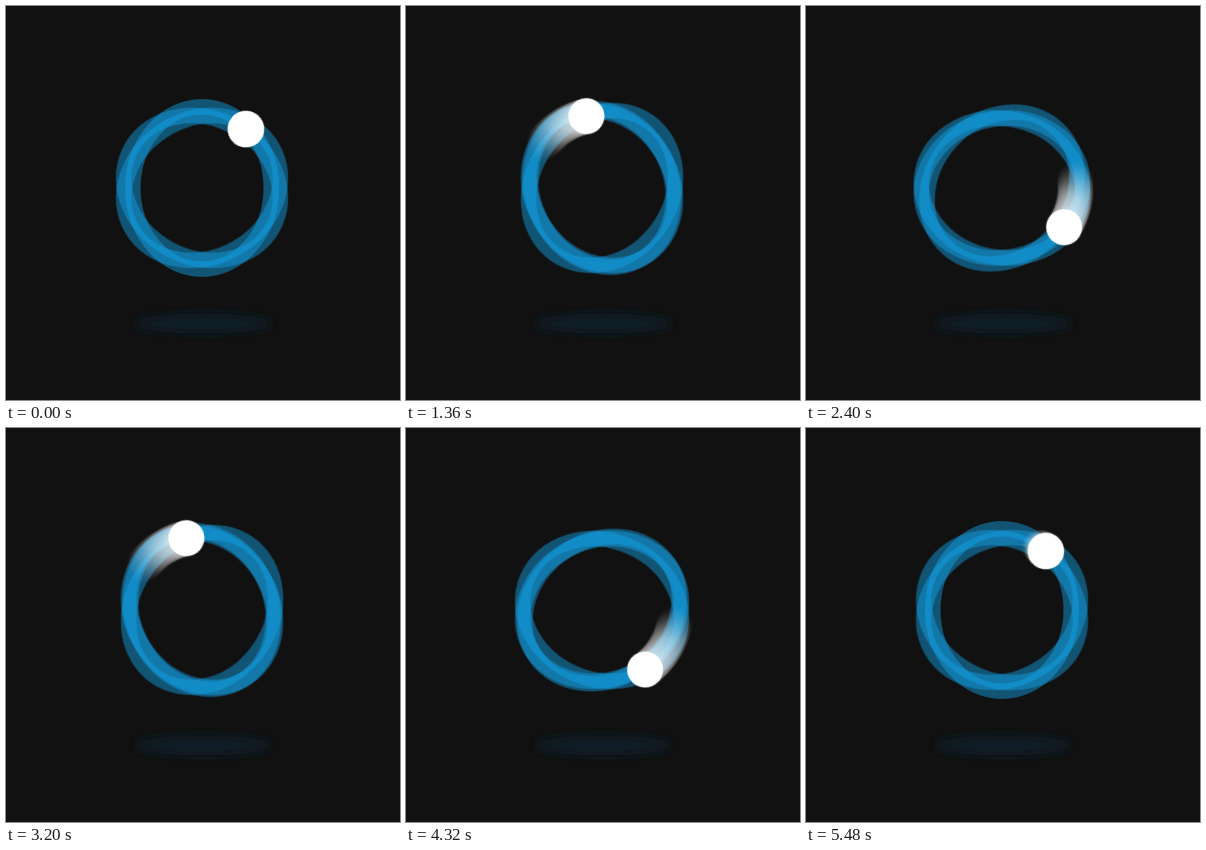
An HTML page for the animation above (5.52 s loop, 394 px wide and 394 px high).

```html
<!DOCTYPE html>
<html lang="en">
<head>
<meta charset="utf-8">
<title>Orbit loader</title>
<style>
  html, body {
    margin: 0;
    width: 100%;
    height: 100%;
    overflow: hidden;
    background: #111;
  }
  svg { display: block; width: 100%; height: 100%; }

  .ring, .ball { animation: 1840ms linear infinite both; }
  .ring {
    fill: none;
    stroke: #12a4ec;
    stroke-width: 15.5;
    stroke-opacity: .45;
    animation-name: spin;
  }
  .ball { fill: #fff; animation-name: orbit; }

  /* Ease through the turn, then rest briefly before the next one. */
  @keyframes spin {
    0% { transform: rotate(var(--from)); animation-timing-function: cubic-bezier(.333, 0, .667, 1); }
    96.25%, 100% { transform: rotate(var(--to)); }
  }
  @keyframes orbit {
    0% { transform: rotate(-53.3deg); animation-timing-function: cubic-bezier(.333, 0, .667, 1); }
    96.25%, 100% { transform: rotate(306.7deg); }
  }
</style>
</head>
<body>
<svg viewBox="0 0 394 394">
  <defs>
    <filter id="soft" x="-20%" y="-150%" width="140%" height="400%">
      <feGaussianBlur stdDeviation="5"/>
    </filter>
  </defs>
  <ellipse cx="197" cy="317.5" rx="69" ry="10" fill="#0f1f25" filter="url(#soft)"/>
  <g transform="translate(196 182)">
    <ellipse class="ring" rx="81.2" ry="69.2" style="--from: 90deg; --to: 270deg"/>
    <ellipse class="ring" rx="81.2" ry="69.2" style="--from: 30deg; --to: -150deg"/>
    <ellipse class="ring" rx="81.2" ry="69.2" style="--from: -30deg; --to: 150deg"/>
    <g id="balls"></g>
  </g>
</svg>
<script>
  const balls = document.getElementById('balls');
  const ECHOES = 16;
  const ECHO_GAP = 10; // ms

  function addBall(delay, opacity) {
    const ball = document.createElementNS('http://www.w3.org/2000/svg', 'circle');
    ball.setAttribute('class', 'ball');
    ball.setAttribute('cx', 73.5);
    ball.setAttribute('r', 18);
    ball.style.opacity = opacity;
    ball.style.animationDelay = delay + 'ms';
    balls.append(ball);
  }

  // Oldest echo first, so the solid ball ends up on top.
  for (let i = ECHOES; i > 0; i--) {
    addBall(i * ECHO_GAP, 0.16 * (1 - i / (ECHOES + 3)));
  }
  addBall(0, 1);
</script>
</body>
</html>
```
